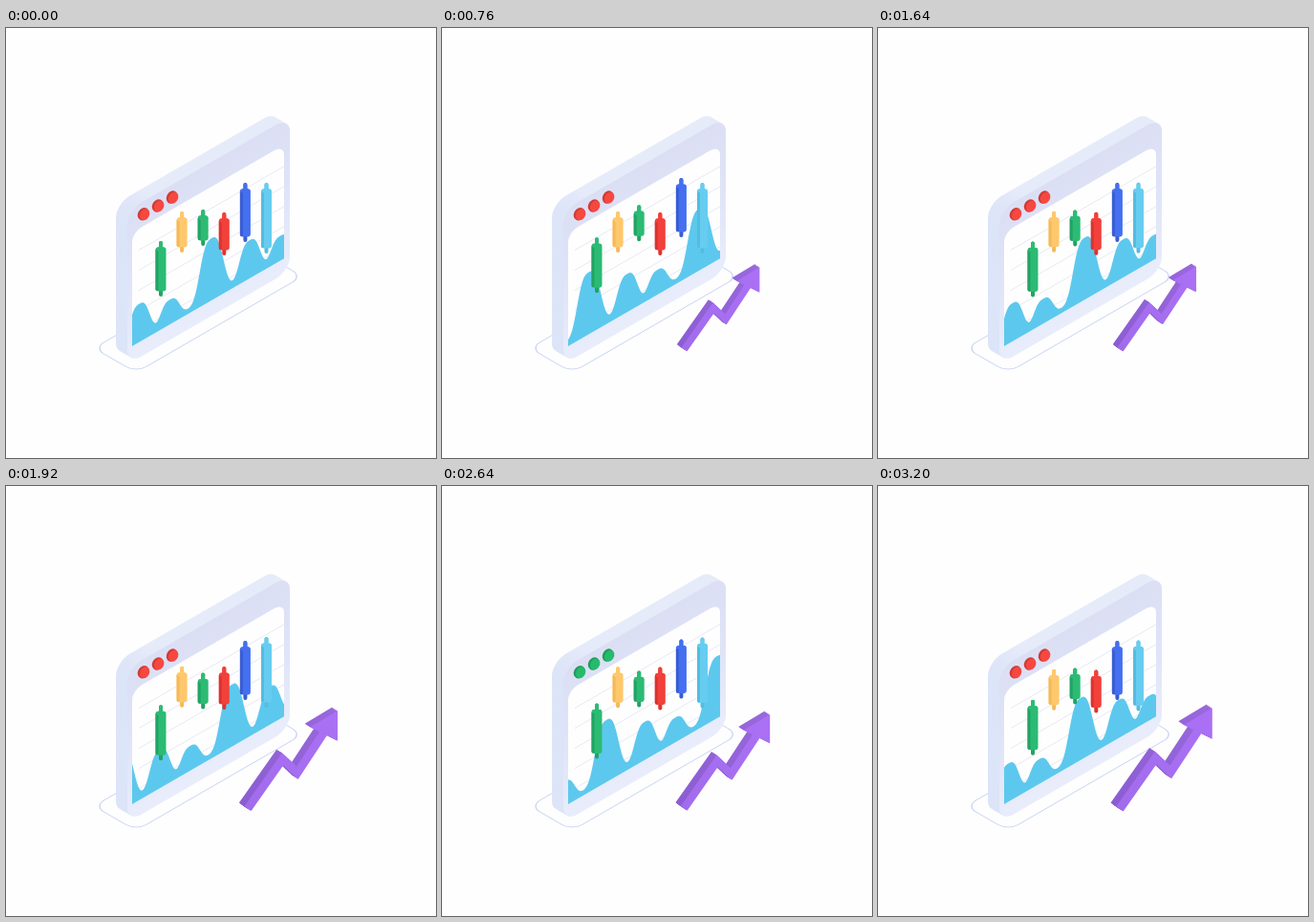
Animation, 450 px wide and 450 px high, one loop 3.24 s. Source, as an HTML page with a canvas:

```html
<!DOCTYPE html>
<html>
<head>
<meta charset="utf-8">
<style>
  html, body { margin: 0; width: 100%; height: 100%; overflow: hidden; background: #fefefe; }
  canvas { display: block; }
</style>
</head>
<body>
<canvas id="stage" width="450" height="450"></canvas>
<script>
const ctx = document.getElementById('stage').getContext('2d');
const LOOP = 3240, CYCLE = LOOP / 2, SLOPE = 0.577;
const HIGH = 380, LOW = 755, HIGH_AGAIN = 1130;

const clamp = v => Math.max(0, Math.min(1, v));
const lerp = (a, b, k) => a + (b - a) * k;

const flat = () => ctx.setTransform(1, 0, 0, 1, 0, 0);
// Plane of the window: origin at the lower left corner of the chart
const iso = (dx = 0, dy = 0) => ctx.setTransform(1, -SLOPE, 0, 1, 132 + dx, 333 + dy);

function box(x, y, w, h, r, fill) {
  ctx.beginPath();
  ctx.roundRect(x, y, w, h, r);
  ctx.fillStyle = fill;
  ctx.fill();
}

function oval(x, y, rx, ry, turn, fill) {
  ctx.beginPath();
  ctx.ellipse(x, y, rx, ry, turn, 0, 7);
  ctx.fillStyle = fill;
  ctx.fill();
}

function blend(x0, y0, x1, y1, ...colors) {
  const g = ctx.createLinearGradient(x0, y0, x1, y1);
  colors.forEach((c, i) => g.addColorStop(i / (colors.length - 1), c));
  return g;
}

function drawBase() {
  ctx.setTransform(0.866, -0.5, 0.866, 0.5, 92, 335);
  box(0, 0, 201, 51, 12, '#fefefe');
  ctx.strokeStyle = '#ccd6f3';
  ctx.lineWidth = 1.2;
  ctx.stroke();
}

function drawBody() {
  for (let d = 12; d >= 0; d--) {
    iso(-d, -d * SLOPE);
    box(-5, -145, 170, 161, 15, blend(-5, 0, 25, 0, '#dce4f8', '#e6ebfa'));
  }
  iso();
  box(-5, -145, 170, 161, 15, blend(0, -145, 0, 16, '#dcdff4', '#dfe4f8', '#e9edfb'));
  box(0, -119, 159, 119, [10, 10, 2, 2], '#fefefe');
  ctx.fillStyle = '#e6e9f3';
  for (let y = -97; y < -10; y += 21) ctx.fillRect(7, y, 152, 1);
}

const RED = [246, 72, 64], GREEN = [38, 186, 108];

function drawDots(t) {
  flat();
  const gap = Math.min(Math.abs(t - 500), Math.abs(t - 1000));
  const mix = clamp(2 - gap / 80);
  const shade = k => `rgb(${RED.map((c, i) => k * lerp(c, GREEN[i], mix))})`;
  for (let i = 0; i < 3; i++) {
    const x = 144.5 + 15 * i, y = 195 - 8.8 * i;
    oval(x - 0.8, y - 0.3, 5.6, 7, 0.5, shade(0.84));
    oval(x + 0.7, y + 0.3, 4.8, 6.2, 0.5, shade(1));
  }
}

const PERIOD = 115.5;
const bumps = [[0, 60], [40, 35], [72, 21]]; // centre, height

function waveHeight(x) {
  return bumps.reduce((sum, [center, height]) => {
    const d = x - center, near = d - PERIOD * Math.round(d / PERIOD);
    return sum + height * Math.exp(-Math.pow(Math.abs(near) / (10 + height / 14), 3));
  }, 5);
}

function drawWave(t) {
  iso();
  const shift = 83 + PERIOD * t / CYCLE;
  ctx.beginPath();
  ctx.moveTo(0, 0);
  for (let x = 0; x <= 159; x++) ctx.lineTo(x, -waveHeight(x - shift));
  ctx.lineTo(159, 0);
  ctx.fillStyle = '#5dc8ee';
  ctx.fill();
}

const candles = [
  { top: 223, size: 58, high: 8, low: -4, color: '#2cbb74', dark: '#22a364' },
  { top: 192, size: 43, high: -4, low: 0, color: '#ffc86c', dark: '#f4b95a' },
  { top: 190, size: 38, high: 7, low: -5, color: '#2cbb74', dark: '#22a364' },
  { top: 193, size: 45, high: -5, low: 0, color: '#f2403a', dark: '#dc3431' },
  { top: 162, size: 62, high: 0, low: -5, color: '#446ff0', dark: '#385dd2' },
  { top: 162, size: 74, high: -5, low: 0, color: '#66cdf0', dark: '#56bbe0' }
];

// Leaves rest, swings high, low, high, and returns to rest
function swing(t, high, low) {
  const edge = Math.min(t / HIGH, (CYCLE - t) / (CYCLE - HIGH_AGAIN));
  return edge < 1 ? high * edge : lerp(low, high, Math.abs(t - LOW) / (LOW - HIGH));
}

function drawCandles(t) {
  flat();
  candles.forEach(({ top, size, high, low, color, dark }, i) => {
    const x = 162 + 22.1 * i, y = top + swing(t, high, low);
    box(x - 2, y, 4, size, 2, dark);
    box(x - 5.5, y + 6.5, 11, size - 12, 3, color);
    box(x - 5.5, y + 8, 3, size - 14, 1.5, dark);
    oval(x, y + 8.5, 5.2, 2.4, 0, color);
    box(x - 2, y, 4, 9, 2, color);
  });
}

const shaft = [[253, 338], [291, 284], [307, 299], [336, 255]];
const head = [[321, 249], [351, 231], [351, 264]];

function trace(points) {
  ctx.beginPath();
  for (const [x, y] of points) ctx.lineTo(x, y);
}

function drawArrow(t) {
  const s = t < LOW
    ? 1 - 0.2 * Math.abs(t - HIGH) / HIGH
    : 1 - 0.2 * Math.exp((LOW - t) / 300);
  for (let d = 7; d >= 0; d--) {
    ctx.setTransform(s, 0, 0, s, 256 * (1 - s) - d * 0.85 * s, 329 * (1 - s) - d * 0.55 * s);
    ctx.fillStyle = ctx.strokeStyle = d
      ? blend(252, 335, 350, 235, '#8c5dd2', '#9868dc')
      : blend(252, 335, 350, 235, '#a16cec', '#ab70f5');
    ctx.lineWidth = 9;
    trace(shaft);
    ctx.stroke();
    trace(head);
    ctx.fill();
  }
}

function draw(now) {
  const time = now % LOOP, t = time % CYCLE;
  flat();
  ctx.fillStyle = '#fefefe';
  ctx.fillRect(0, 0, 450, 450);
  drawBase();
  drawBody();
  drawDots(t);
  drawWave(t);
  drawCandles(t);
  if (time >= 40) drawArrow(t);
}

const start = performance.now();
function tick() {
  draw(performance.now() - start);
  requestAnimationFrame(tick);
}
tick();
</script>
</body>
</html>
```
